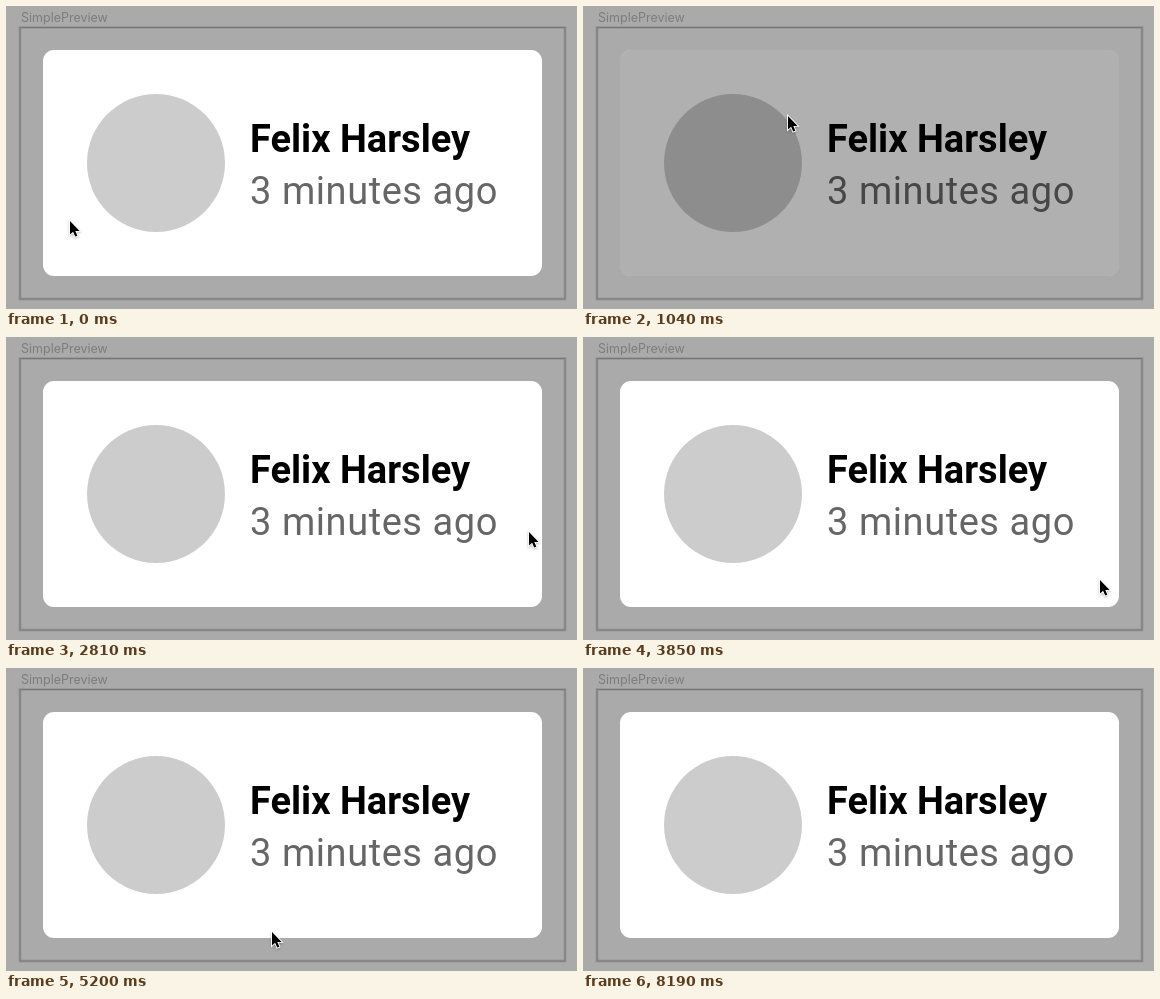
Write an HTML page that moves like this. It is 571x303 px and loops after 9130 ms.

```html
<!DOCTYPE html>
<html lang="en">
<head>
<meta charset="utf-8">
<title>SimplePreview</title>
<style>
  html, body { margin: 0; width: 100%; height: 100%; overflow: hidden; background: #aaa; }
  svg { display: block; width: 571px; height: 303px; overflow: hidden; }
  .label { font: 12.5px Inter, sans-serif; fill: #7d7d7d; }
  .name { font: 700 38px Roboto, sans-serif; }
  .time { font: 400 38px Roboto, sans-serif; letter-spacing: .56px; fill-opacity: .6; }
  .frame { fill: none; stroke: #777; }
  .glow { fill: none; stroke: #000; stroke-width: 3; stroke-opacity: .1; }
  .card { x: 37px; y: 44px; width: 499px; height: 226px; rx: 11px; }
  #cursor { stroke: #fff; stroke-width: 1.8; paint-order: stroke; filter: drop-shadow(0 1px 1px #0004); }
</style>
</head>
<body>
<svg viewBox="0 0 571 303">
  <text class="label" x="15" y="16">SimplePreview</text>
  <rect class="glow" x="14" y="21.5" width="545" height="271.5"/>
  <rect class="frame" x="14" y="21.5" width="545" height="271.5"/>
  <rect class="card" fill="#fff"/>
  <circle cx="150" cy="157" r="69" fill-opacity=".2"/>
  <text class="name" x="244" y="146">Felix Harsley</text>
  <text class="time" x="244" y="198.3">3 minutes ago</text>
  <rect class="card" id="ripple" fill-opacity="0"/>
  <path id="cursor" d="M0 0V13.6L3.1 10.7 5.2 15.6 7.4 14.7 5.3 9.9H9.6Z"/>
</svg>
<script>
  const LOOP = 9130, TICK = 148.5;
  const PRESS = 0.31, HOLD = 2;
  const ripple = document.getElementById('ripple');
  const cursor = document.getElementById('cursor');

  // Ticks at which the card is pressed
  const presses = [6, 14, 23, 29];

  // Pointer key points: tick, x, y
  const path = [
    [0, 64, 215], [7, 205, 110], [8, 208, 110], [13, 460, 149], [16, 490, 165],
    [19, 523, 195], [23, 518, 240], [26, 517, 243], [31, 516, 243], [35, 266, 264],
    [37, 208, 273], [39, 203, 281], [42, 201, 280], [46, 201, 280], [51, 20, 280],
    [53, 20, 280], [54, 65, 286]
  ];

  function pointAt(tick) {
    const i = Math.max(1, path.findIndex(p => p[0] >= tick));
    const [t0, x0, y0] = path[i - 1], [t1, x1, y1] = path[i];
    const k = (tick - t0) / (t1 - t0);
    return [x0 + (x1 - x0) * k, y0 + (y1 - y0) * k].map(Math.round);
  }

  // Full shade while held, half on release, then clear
  function shade(tick) {
    const age = Math.min(...presses.filter(p => p <= tick).map(p => tick - p));
    return age < HOLD ? PRESS : age === HOLD ? PRESS / 2 : 0;
  }

  function draw() {
    const t = performance.now() % LOOP;
    const tick = Math.floor((t + 15) / TICK);
    const visible = tick < 55;
    ripple.setAttribute('fill-opacity', shade(tick));
    cursor.style.display = visible ? '' : 'none';
    if (visible) cursor.setAttribute('transform', `translate(${pointAt(tick)})`);
    requestAnimationFrame(draw);
  }
  draw();
</script>
</body>
</html>
```
